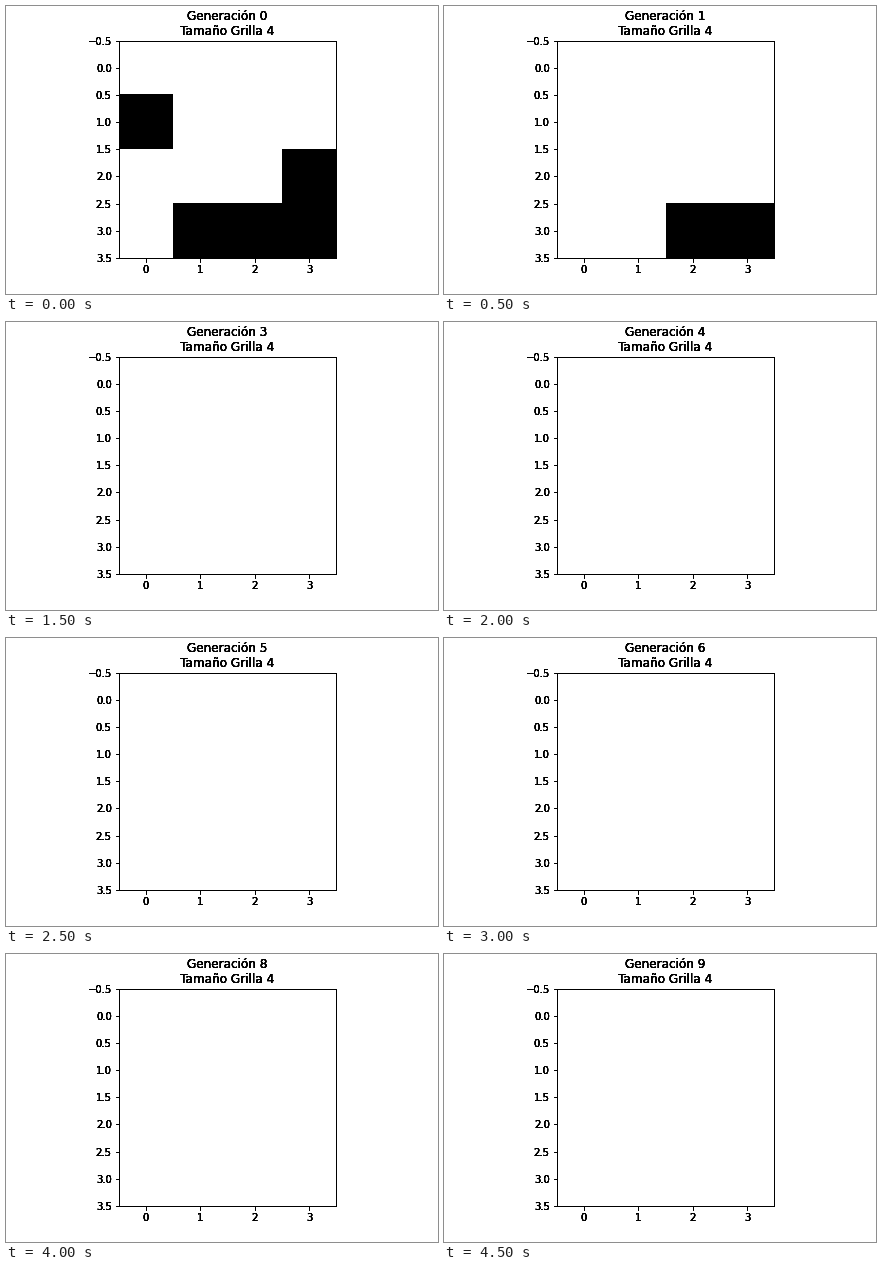
Write a matplotlib script that moves like this. It is 432 by 288 pixels and loops after 5000 ms.

```python
import matplotlib.pyplot as plt
import numpy as np
from matplotlib.animation import FuncAnimation

plt.rcParams["font.family"] = "DejaVu Sans"

SIZE = 4
GENERATIONS = 10
LAYERS = 6  # stacked axes harden the antialiased edges of text and lines
ALIVE = {
    0: [(1, 0), (2, 3), (3, 1), (3, 2), (3, 3)],
    1: [(3, 2), (3, 3)],
}

fig = plt.figure(figsize=(6, 4), dpi=72, facecolor="white")


def make_axes(layer):
    ax = fig.add_axes([0.125, 0.125, 0.775, 0.755], label=f"layer{layer}")
    ax.set(xlim=(-0.5, SIZE - 0.5), ylim=(SIZE - 0.5, -0.5))
    ax.set_aspect("equal")
    ax.set_xticks(range(SIZE))
    ax.set_yticks(np.arange(-0.5, SIZE, 0.5))
    ax.tick_params(labelsize=10)
    ax.patch.set_visible(False)
    return ax


layers = [make_axes(i) for i in range(LAYERS)]
titles = [ax.set_title("", fontsize=12) for ax in layers]
image = layers[0].imshow(np.zeros((SIZE, SIZE)), cmap="binary", vmin=0, vmax=1,
                         interpolation="nearest")


def grid(generation):
    cells = np.zeros((SIZE, SIZE))
    for row, col in ALIVE.get(generation, []):
        cells[row, col] = 1
    return cells


def update(generation):
    image.set_data(grid(generation))
    for title in titles:
        title.set_text(f"Generación {generation}\nTamaño Grilla {SIZE}")
    return [image, *titles]


anim = FuncAnimation(fig, update, frames=GENERATIONS, interval=500,
                     init_func=lambda: update(0), repeat=True)
plt.show()
```
